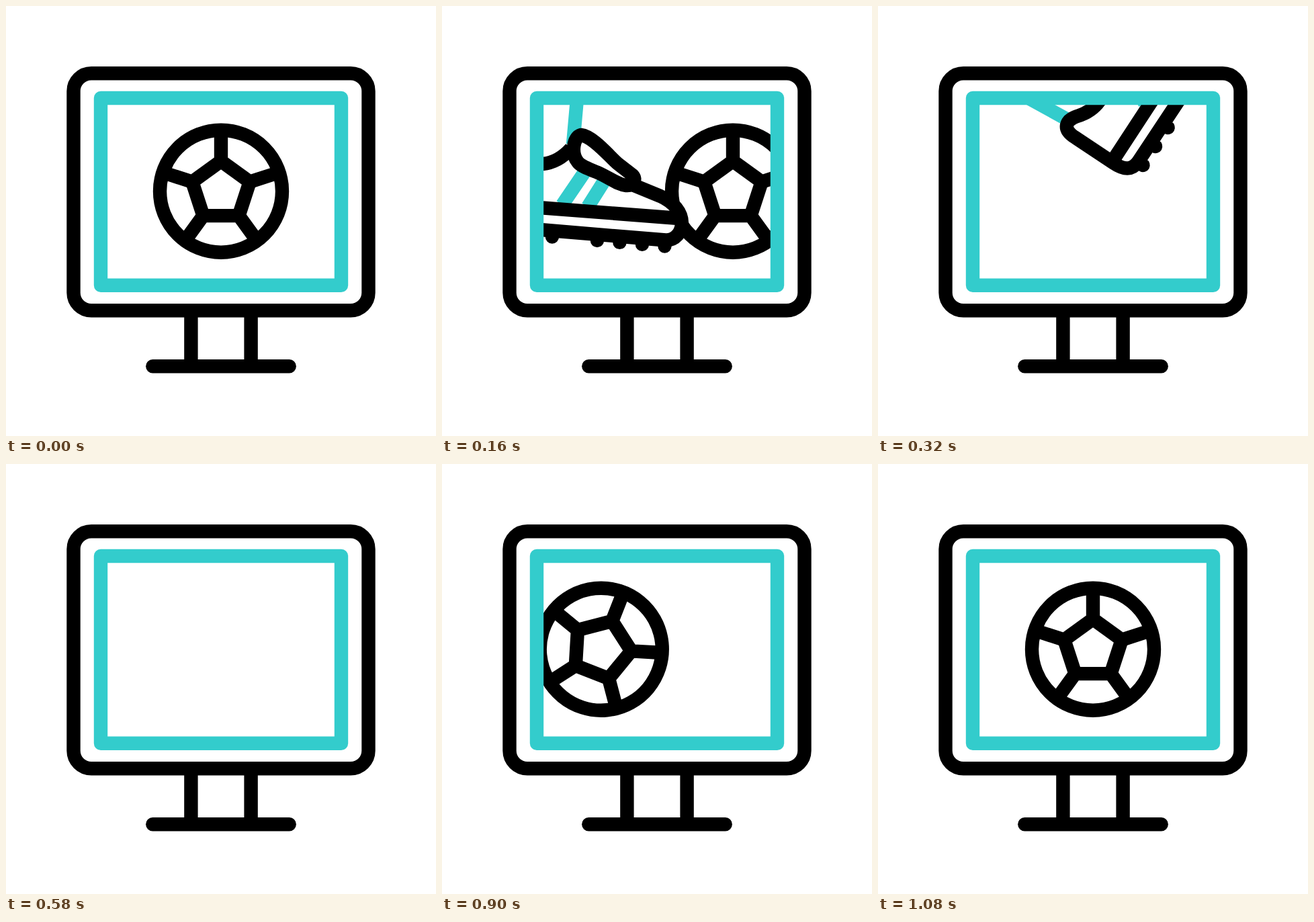
Write an HTML page that moves like this. It is 640x640 px and loops after 1600 ms.

```html
<!DOCTYPE html>
<html lang="en">
<head>
<meta charset="utf-8">
<title>Football on screen</title>
<style>
  html, body { margin: 0; width: 100%; height: 100%; overflow: hidden; background: #fff; }
  svg { display: block; width: 100%; height: 100%; }
  .line { fill: none; stroke: #000; stroke-width: 20.4; stroke-linejoin: round; }
  .cyan { stroke: #33cccc; }
  .white { fill: #fff; }
</style>
</head>
<body>
<svg viewBox="0 0 640 640">
  <clipPath id="screen"><rect x="141" y="137" width="358" height="279"/></clipPath>

  <g clip-path="url(#screen)">
    <g id="ball" class="line">
      <circle r="91"/>
      <path id="seams"/>
    </g>
    <g id="leg" class="line">
      <path class="cyan" d="M102.500 60V205M208 60L195 206"/>
      <path class="white" stroke="none" d="M79 297L84.600 230C86 205 101 205 114 217C128 231 142 234 155 235Q175 230 192 214L288 267L325 283C345 292 357 307 357 323C357 337 347 349 333 348.500L98 329Q80 326 79 297Z"/>
      <path class="cyan" d="M213 246L179 296M241 261L217 299"/>
      <path d="M192 212Q173 233 150 235C142 234 128 231 114 217C101 205 86 205 84.600 230L79 297C77 318 83 327 98 329L333 348.500C347 349 357 337 357 323C357 307 345 292 325 283L286 267"/>
      <path d="M79 295L352 316"/>
      <path class="white" d="M207 192C225 194 250 225 262 235L284 252C290 259 284 268 274 267C262 266 250 256 232 248C217 242 206 238 202 232C192 220 195 195 207 192Z"/>
      <g id="studs" fill="#000" stroke="none"></g>
    </g>
  </g>

  <rect class="line cyan" x="141" y="137" width="358" height="278.700"/>
  <rect class="line" x="100.500" y="100.200" width="439" height="353" rx="26.500"/>
  <path class="line" d="M275.400 453V536M364.600 453V536"/>
  <path class="line" stroke-linecap="round" d="M218.300 536.300H421.700"/>
</svg>
<script>
  const LOOP = 1600, STEP = 20;
  const $ = id => document.getElementById(id);

  // Pentagon with a seam from each corner to the rim
  const corner = (i, r) => {
    const a = (i * 72 - 90) * Math.PI / 180;
    return `${r * Math.cos(a)} ${r * Math.sin(a)}`;
  };
  const five = [0, 1, 2, 3, 4];
  $('seams').setAttribute('d', `M${five.map(i => corner(i, 45)).join('L')}Z` +
    five.map(i => `M${corner(i, 45)}L${corner(i, 91)}`).join(''));

  $('studs').innerHTML = [0, 1, 2, 3, 5, 6, 7].map(i =>
    `<circle cx="${331.5 - 33.5 * i}" cy="${357.5 - 2.8 * i}" r="10.2"/>`).join('');

  // Bezier easing (.167, 0, .833, 1), solved by bisection
  function ease(u) {
    let lo = 0, hi = 1, s = u;
    for (let i = 0; i < 24; i++) {
      s = (lo + hi) / 2;
      const x = 3 * s * (1 - s) * (.167 * (1 - s) + .833 * s) + s ** 3;
      if (x < u) lo = s; else hi = s;
    }
    return s * s * (3 - 2 * s);
  }

  function draw(t) {
    let x, turn = 0;
    if (t < 440) {
      x = 320 + Math.max(0, t - 80) * 1.4125;  // kicked away
    } else {
      const u = Math.min(1, (t - 440) / 640);  // rolls back in
      x = -24 + 344 * ease(u);
      turn = 180 * (u - 1);
    }
    $('ball').setAttribute('transform', `translate(${x} 275.7) rotate(${turn})`);

    const swing = 41 - .193 * t - .000395 * t * t;
    $('leg').setAttribute('transform', `rotate(${swing} 160.5 36)`);
    $('leg').setAttribute('visibility', t < 400 ? 'visible' : 'hidden');
  }

  const start = performance.now();
  function tick() {
    const t = (performance.now() - start) % LOOP;
    draw(Math.floor(t / STEP) * STEP);
    requestAnimationFrame(tick);
  }
  tick();
</script>
</body>
</html>
```
